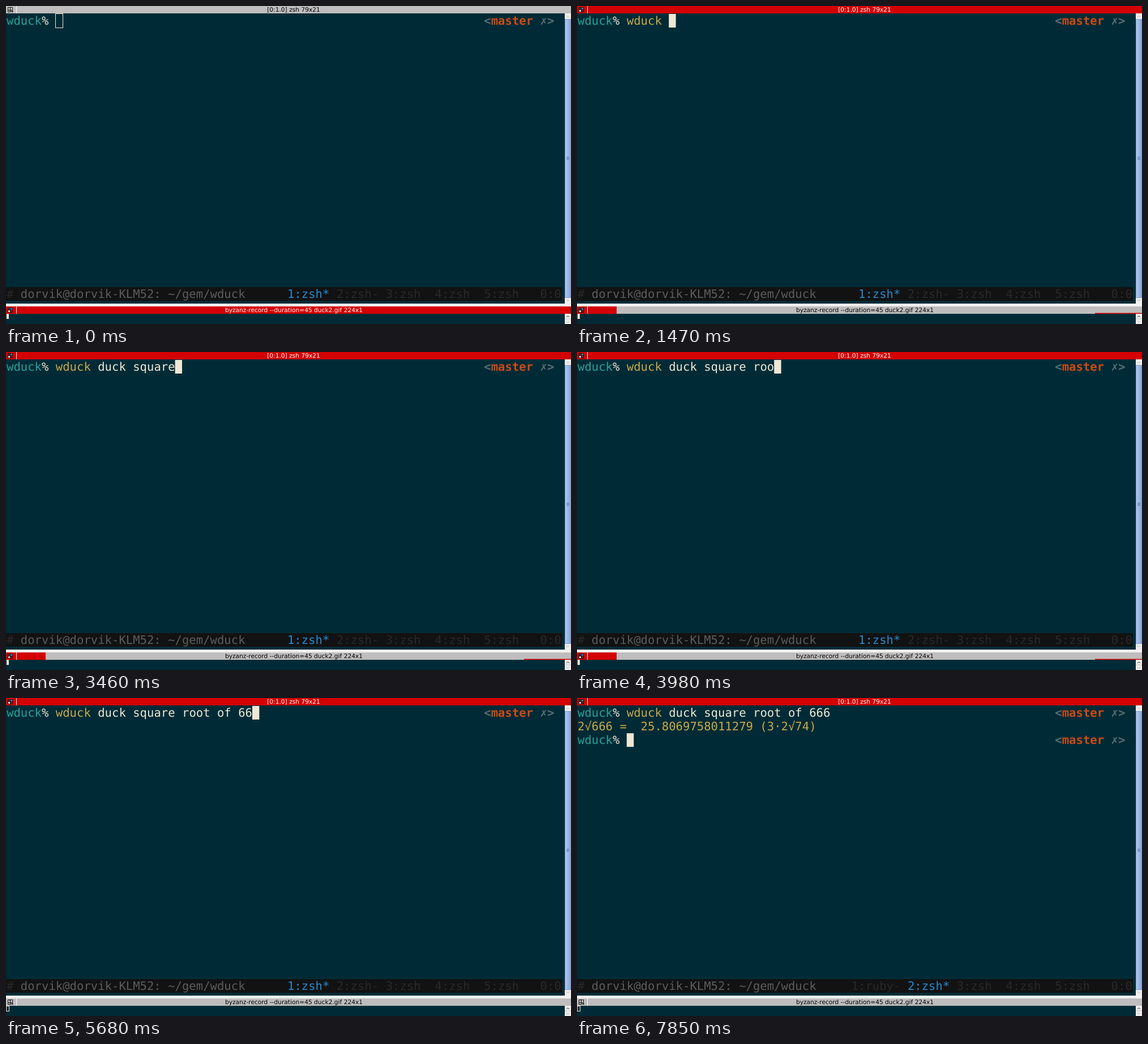
Recreate the animation shown at these times as an HTML page. Size 998 by 561 pixels, loop 8000 ms.

```html
<!DOCTYPE html>
<html lang="en">
<head>
<meta charset="utf-8">
<title>Terminal session</title>
<style>
html, body { margin: 0; width: 100%; height: 100%; overflow: hidden; background: #002b36; }
svg { display: block; width: 998px; height: 561px; }
text { white-space: pre; text-rendering: geometricPrecision; }
.mono { font: 20.6px "DejaVu Sans Mono", monospace; }
.title { font: 10.67px "DejaVu Sans", sans-serif; text-anchor: middle; }
.bold { font-weight: bold; }
.teal { fill: #2aa198; }
.light { fill: #eee8d5; }
.gold { fill: #c9a84c; }
.grey { fill: #586e75; }
.orange { fill: #cb4b16; }
.dim { fill: #292929; }
.mid { fill: #5c5c5c; }
.blue { fill: #268bd2; }
</style>
</head>
<body>
<svg viewBox="0 0 998 561">
  <defs>
    <linearGradient id="slider">
      <stop offset="0" stop-color="#b3c9ee"/>
      <stop offset="1" stop-color="#86a5da"/>
    </linearGradient>
    <g id="prompt" class="mono">
      <text x="1" y="33"><tspan class="teal">wduck</tspan><tspan class="light">%</tspan></text>
      <text x="844.3" y="33" class="bold grey">&lt;<tspan class="orange">master</tspan> ✗&gt;</text>
    </g>
    <g id="iconIdle" fill="none" stroke="#111">
      <path d="M3.5 2.5h8v5h-8zM7.5 2.5v8M3.5 7.5v3h5M9 9.5h4M11 7.5v4"/>
    </g>
    <g id="iconLive">
      <path d="M3 2h9v9h-9z" fill="#181818"/>
      <path d="M8 3h3v3h-3z" fill="#2c7fc0"/>
      <path d="M4 7h3v3h-3z" fill="#e8e8e8"/>
      <path d="M4 3h3v3h-3zM8 7h3v3h-3z" fill="#7d1717"/>
    </g>
  </defs>

  <!-- upper pane -->
  <rect id="topBar" width="998" height="13"/>
  <use id="topIdle" href="#iconIdle"/>
  <use id="topLive" href="#iconLive"/>
  <rect x="18" width="1" height="13" fill="#fff"/>
  <text id="topTitle" class="title" x="508" y="10">[0:1.0] zsh 79x21</text>

  <use href="#prompt"/>
  <text class="mono" x="87.8" y="33"><tspan id="cmd" class="gold"></tspan><tspan id="args" class="light"></tspan></text>
  <g id="result">
    <text class="mono gold" x="1" y="57">2√666 =  25.8069758011279 (3·2√74)</text>
    <use href="#prompt" y="48.2"/>
  </g>
  <rect id="hollow" x="87.5" y="13.5" width="13" height="25" fill="none" stroke="#eee8d5"/>
  <rect id="caret" width="12.4" height="24" fill="#eee8d5"/>
  <path id="pointer" d="M339.5 46.5h5M342 46.5v12M339.5 58.5h5" fill="none" stroke="#ddd"/>

  <!-- status line -->
  <rect y="496" width="982" height="24" fill="#121212"/>
  <g class="mono">
    <text x="1" y="515" class="dim">#</text>
    <text id="label" x="25.8" y="515" class="mid"></text>
    <text id="tab1" y="515"></text>
    <text id="tab2" x="583.9" y="515"></text>
    <text x="670.7" y="515" class="dim">3:zsh  4:zsh  5:zsh</text>
    <text x="943.6" y="515" class="dim">0:0</text>
  </g>

  <!-- scrollbar -->
  <rect x="987" y="13" width="11" height="512" fill="#f0eeec"/>
  <rect x="987.5" y="23.5" width="10" height="491" fill="url(#slider)" stroke="#7f9bcb"/>
  <path d="M990 266.5h5M990 268.5h5M990 270.5h5" stroke="#5d79ac"/>
  <path d="M990 20l2.5-2.5 2.5 2.5M990 518l2.5 2.5 2.5-2.5" fill="none" stroke="#b5b2af"/>

  <!-- divider -->
  <rect y="525" width="998" height="5" fill="#f2f1f0"/>
  <path d="M482 527.5h33" stroke="#b4b2b0" stroke-dasharray="1 2"/>

  <!-- lower pane -->
  <rect id="lowBar" y="530" width="998" height="13"/>
  <rect id="lowMid" x="70" y="530" width="845" height="13" fill="#bfbdbd"/>
  <rect id="lowEnd" x="915" y="530" width="83" height="11.5" fill="#bfbdbd"/>
  <use id="lowIdle" href="#iconIdle" y="530"/>
  <use id="lowLive" href="#iconLive" y="530"/>
  <rect x="18" y="530" width="1" height="13" fill="#fff"/>
  <text id="lowTitle" class="title" x="508.5" y="540">byzanz-record --duration=45 duck2.gif 224x1</text>
  <rect id="lowHollow" x=".5" y="543.5" width="5" height="9" fill="none" stroke="#eee8d5"/>
  <rect id="lowCaret" x="1" y="543" width="4" height="9" fill="#eee8d5"/>
  <rect x="987" y="543" width="11" height="18" fill="#f0eeec"/>
  <path d="M987 552h11" stroke="#c5c2bf"/>
  <path d="M990 549l2.5-2.5 2.5 2.5" fill="none" stroke="#222"/>
  <path d="M990 555.5l2.5 2.5 2.5-2.5" fill="none" stroke="#b5b2af"/>
</svg>
<script>
const LOOP = 8000, CELL = 12.4, ROW = 24.1;
const RED = '#d30102', GREY = '#bfbdbd';
const LINE = 'wduck duck square root of 666';
const HOST = 'dorvik@dorvik-KLM52: ~/gem/wduck';
const KEYS = [
  960, 1020, 1130, 1240, 1350, 1470,
  1680, 1780, 1880, 1980, 2080,
  2310, 3060, 3160, 3260, 3360, 3460, 3560,
  3760, 3840, 3980, 4110, 4240,
  4570, 4680, 4890, 5550, 5680, 6590
];
const BLINKS = [[2870, 3060], [5350, 5550], [6240, 6590]];
const FOCUS = 770, BLUR = 4890, ENTER = 6960, RENAME = 7220, DONE = 7850;

const $ = id => document.getElementById(id);
const show = (id, on) => $(id).setAttribute('visibility', on ? 'visible' : 'hidden');
const fill = (id, color) => $(id).setAttribute('fill', color);
const write = (id, text) => { if ($(id).textContent !== text) $(id).textContent = text; };

function tab(id, text, active) {
  write(id, text);
  $(id).setAttribute('class', active ? 'blue' : 'dim');
}

function draw(t) {
  const focused = t >= FOCUS, blurred = t >= BLUR, done = t >= DONE;
  const running = t >= ENTER && !done, renamed = t >= RENAME;

  fill('topBar', focused ? RED : GREY);
  fill('topTitle', focused ? '#fff' : '#000');
  show('topIdle', !focused);
  show('topLive', focused);
  show('hollow', !focused);
  show('pointer', t >= 170 && !focused);

  const typed = LINE.slice(0, KEYS.filter(k => t >= k).length);
  write('cmd', typed.slice(0, 5));
  write('args', typed.slice(5));
  show('result', done);

  const row = done ? 2 : running ? 1 : 0;
  const col = done ? 7 : running ? 0 : 7 + typed.length;
  $('caret').setAttribute('x', 1 + col * CELL);
  $('caret').setAttribute('y', 14 + row * ROW);
  show('caret', focused && !BLINKS.some(([a, b]) => t >= a && t < b));

  write('label', running ? LINE : HOST);
  tab('tab1', done ? '1:ruby-' : renamed ? '1:ruby*' : '1:zsh*', !done);
  tab('tab2', done ? '2:zsh*' : '2:zsh-', done);
  $('tab1').setAttribute('x', 1 + (renamed ? 39 : 40) * CELL);

  // the lower bar repaints in patches after losing focus
  const patched = t >= 850;
  fill('lowBar', blurred ? GREY : RED);
  show('lowMid', patched);
  show('lowEnd', t >= 1130);
  fill('lowTitle', patched ? '#000' : '#fff');
  show('lowIdle', blurred);
  show('lowLive', !blurred);
  show('lowHollow', blurred);
  show('lowCaret', !blurred);
}

function tick() {
  draw(performance.now() % LOOP);
  requestAnimationFrame(tick);
}
tick();
</script>
</body>
</html>
```
